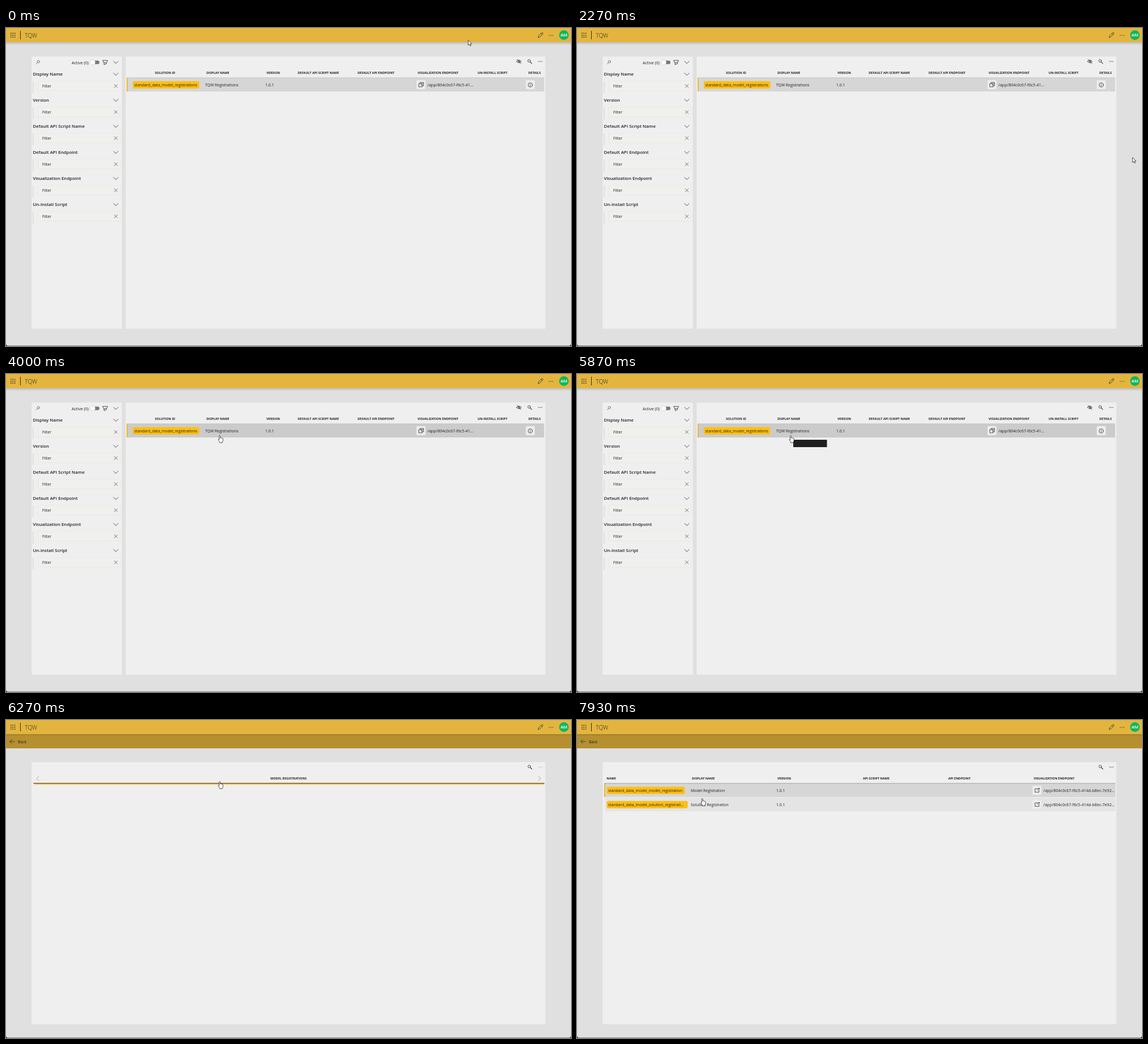
An HTML page that plays this animation: 998 px wide and 561 px high, repeating every 8 s.

```html
<!DOCTYPE html>
<html lang="en">
<head>
<meta charset="utf-8">
<title>Registrations</title>
<style>
  html, body { margin: 0; width: 100%; height: 100%; overflow: hidden; background: #2a2a2a; }
  svg { display: block; width: 998px; height: 561px; }
  text { font: 6.9px "Open Sans", sans-serif; fill: #222; white-space: pre; }
  .head { font-size: 5.5px; font-weight: 700; }
  .group { font-size: 7.9px; font-weight: 600; }
  .path { font-size: 7.1px; }
  .pill { font-size: 6.8px; }
  .title { font-size: 10.2px; font-weight: 300; }
  .ln { fill: none; stroke: #333; stroke-width: .85; stroke-linecap: round; stroke-linejoin: round; }
  .cur { fill: #fff; stroke: #222; stroke-width: .8; stroke-linejoin: round; }
</style>
</head>
<body>
<svg id="stage" viewBox="0 0 998 561" xmlns="http://www.w3.org/2000/svg"></svg>
<script>
const LOOP = 8000, STEP = 200 / 3;

const text = (x, y, s, cls = '', more = '') => `<text x="${x}" y="${y}" class="${cls}" ${more}>${s}</text>`;
const rect = (x, y, w, h, fill, more = '') => `<rect x="${x}" y="${y}" width="${w}" height="${h}" fill="${fill}" ${more}/>`;
const line = (d, more = '') => `<path class="ln" d="${d}" ${more}/>`;
const dot = (x, y, r, fill = '#333') => `<circle cx="${x}" cy="${y}" r="${r}" fill="${fill}"/>`;
const group = (id, body) => `<g id="${id}">${body}</g>`;

const panel = (x, y, w, h) => rect(x, y, w, h, '#efefef', 'stroke="#d9d9d9" stroke-width=".5"');
const dots = (x, y, gap = 2.8) => [-gap, 0, gap].map(d => dot(x + d, y, .75)).join('');
const chevron = (x, y) => line(`M${x - 4} ${y - 2}l4 4 4-4`);
const cross = (x, y) => line(`M${x - 2.8} ${y - 2.8}l5.6 5.6m0-5.6l-5.6 5.6`, 'style="stroke-width:.65"');
const search = (x, y) => line(`M${x + .9} ${y + .9}l2.7 2.7`, 'style="stroke-width:1.2"') +
  `<circle class="ln" cx="${x - 1}" cy="${y - 1}" r="2.3"/>`;
const button = (x, y) => rect(x, y, 16, 16, '#ececec', 'rx="2"');
const pill = (x, y, w, s) => rect(x, y, w, 13, '#fdbf13', 'rx="2.8"') + text(x + 2.5, y + 8.9, s, 'pill');
const heads = (y, cols) => cols.map(([x, s]) => text(x, y, s, 'head')).join('');

function topBar() {
  let s = rect(0, 0, 998, 25, '#e4b53e');
  for (let i = 0; i < 9; i++) s += rect(8 + i % 3 * 3.4, 8.5 + (i / 3 | 0) * 3.4, 1.6, 1.6, '#333');
  return s + rect(25, 5, 1, 15, '#3a3010') + text(33.3, 16.7, 'TQW', 'title') +
    line('M940 16.5l.7-2.7 5.4-5.4q1.1-.8 2 .1t.1 2l-5.4 5.3z M945 9.5l2 2') +
    dots(962.8, 13, 3.2) + dot(985.5, 12.5, 8.5, '#12b55f') +
    text(985.5, 15.3, 'AM', '', 'text-anchor="middle" style="fill:#fff;font-size:7.6px;font-weight:600"');
}

function filters() {
  const names = ['Display Name', 'Version', 'Default API Script Name', 'Default API Endpoint',
    'Visualization Endpoint', 'Un-Install Script'];
  return panel(45, 50, 160, 481) +
    '<circle class="ln" cx="57.2" cy="59.4" r="2.1" style="stroke-width:.6"/>' +
    line('M55.6 61l-2.3 2.3', 'style="stroke-width:.6"') +
    text(116, 63.5, 'Active (0)', 'path') +
    rect(151, 57.4, 14, 6.4, '#777', 'rx="3.2"') +
    `<circle cx="153" cy="60.6" r="4.7" fill="#fafafa" stroke="#bbb" stroke-width=".5"/>` +
    line('M171 57.2h8.6l-2.2 4h-4.2z M173.2 61.2v3.6l4.2-1.8v-1.8') + chevron(194, 60.7) +
    names.map((name, i) => {
      const y = 81.5 + i * 46;
      return text(47.5, y + 2.9, name, 'group') + chevron(194, y) +
        rect(47.5, y + 12.5, 1, 21, '#d3d3dc') +
        rect(56.5, y + 12.5, 145, 16.5, '#f0f0ef', 'stroke="#ece5d3" stroke-width=".7"') +
        text(64, y + 23.4, 'Filter') + cross(194, y + 20.8);
    }).join('');
}

function solutions() {
  return panel(211, 50, 742, 481) +
    line('M902 59q4-5 8.2 0q-4 5-8.2 0zM902.7 55.4l7 7.2') +
    '<circle class="ln" cx="906.1" cy="59" r="1.3"/>' + search(925, 59) + dots(943.7, 59) +
    heads(81.2, [[263, 'SOLUTION ID'], [354, 'DISPLAY NAME'], [460, 'VERSION'],
      [515.3, 'DEFAULT API SCRIPT NAME'], [621, 'DEFAULT API ENDPOINT'],
      [727, 'VISUALIZATION ENDPOINT'], [833, 'UN-INSTALL SCRIPT'], [922.8, 'DETAILS']]) +
    rect(213, 88, 737.5, 24, '#d6d6d6', 'id="solRow"') +
    rect(213, 87.5, 737.5, .8, '#bababa') + rect(213, 88, 2, 24, '#f5bb1c') +
    pill(224, 93.8, 117.5, 'standard_data_model_registrations') +
    text(351.7, 102.8, 'TQW Registrations') + text(458, 102.8, '1.0.1') +
    button(725, 92) + line('M729.5 98h5.5v5.8h-5.5zM731.5 98v-2h6v6h-2.5M733 100.5l2.8-2.8') +
    text(744.3, 102.9, '/app/804c0c67-f6c5-41...', 'path') +
    button(918, 92) + '<circle class="ln" cx="926" cy="100.4" r="3.7"/>' +
    line('M926 100v2.2M926 98.4v.1');
}

function modelRow(id, y, fill, width, key, name) {
  return rect(50, y, 901, 24, fill, `id="${id}"`) + pill(52.5, y + 5.8, width, key) +
    text(201, y + 14.9, name) + text(352, y + 14.9, '1.0.1') + button(804.5, y + 4) +
    line(`M814 ${y + 9.3}h-5v6h7v-3.5M813.5 ${y + 11.7}l3.2-3.2m-1.7 0h1.7v1.7`) +
    text(823.8, y + 14.9, '/app/804c0c67-f6c5-414d-b8ec-7e92...', 'path');
}

const models = () => dots(944, 83) +
  heads(105.3, [[52.3, 'NAME'], [203, 'DISPLAY NAME'], [354, 'VERSION'], [505, 'API SCRIPT NAME'],
    [655.8, 'API ENDPOINT'], [806.7, 'VISUALIZATION ENDPOINT']]) +
  modelRow('row1', 112, '#d6d6d6', 138, 'standard_data_model_model_registration', 'Model Registration') +
  modelRow('row2', 137, '#efefef', 143, 'standard_data_model_solution_registrati...', 'Solution Registration') +
  rect(48, 111.4, 903, .9, '#999') + rect(48, 112, 2, 24, '#e9b62c');

const loading = () => rect(940, 82.6, 8, .8, '#c4c4c4') +
  line('M58 99.3l-4 4 4 4M940.5 99.3l4 4-4 4', 'style="stroke:#999"') +
  text(499, 105.3, 'MODEL REGISTRATIONS', 'head', 'text-anchor="middle"') +
  rect(48, 111, 903, 1, '#57482a') + rect(50, 112, 901, 1.8, '#f0b41c');

const stage = document.getElementById('stage');
stage.innerHTML = `<defs><linearGradient id="shade" x2="0" y2="1">
    <stop stop-color="#000" stop-opacity=".16"/><stop offset="1" stop-color="#000" stop-opacity="0"/>
  </linearGradient><clipPath id="win">${rect(0, -4, 998, 564.4, '#fff', 'rx="4"')}</clipPath></defs>
  <g clip-path="url(#win)">` + rect(0, 0, 998, 561, '#e0e0e0') +
  group('list', rect(0, 25, 998, 5, 'url(#shade)') + filters() + solutions()) +
  group('detail', rect(0, 25, 998, 25, '#b69030') + rect(0, 25, 998, 3, 'url(#shade)') +
    line('M15 38H6.8m3.5-3.5L6.8 38l3.5 3.5') + text(21, 40.5, 'Back') +
    group('sheet', panel(45, 74, 908, 463) + search(925.3, 83)) +
    group('loading', loading()) + group('models', models())) +
  topBar() +
  group('tip', rect(382, 116, 59.5, 13, '#1f1f1f') +
    text(386, 124.7, 'TQW Registrations', '', 'id="tipText" style="fill:#eee;font-size:5.9px"')) +
  group('cursor',
    '<path id="arrow" class="cur" d="M0 0v8.8l2-1.8 1.4 3 1.5-.7-1.4-2.9h2.7z"/>' +
    '<path id="hand" class="cur" d="M-.9 7.2V1Q-.8 0 0 0t1 1v3.4q1-.7 1.7.2q1-.6 1.7.3q1.3-.3 1.3 1v2.6q0 1.8-1.1 3.2v1H.2v-1L-2.1 8.2q-.8-1.3.2-1.7z"/>') +
  '</g>';

const el = {};
stage.querySelectorAll('[id]').forEach(n => el[n.id] = n);
const show = (id, on) => { el[id].style.display = on ? '' : 'none'; };

// Pointer stops: time, x, y
const stops = [[0, 816.4, 21.6], [66, 816.4, 21.6], [200, 838, 23.5], [2200, 838, 23.5],
  [2266, 981.3, 228.4], [2800, 441.5, 235], [3270, 809, 170], [3730, 350.5, 97.5],
  [4000, 377.5, 108.5], [7133, 377.5, 108.5], [7400, 255, 128], [7600, 255, 128], [7930, 221.3, 138.6]];

function pointer(t) {
  const i = stops.findIndex(s => s[0] > t);
  if (i < 0) return stops[stops.length - 1].slice(1);
  const [t0, x0, y0] = stops[i - 1], [t1, x1, y1] = stops[i];
  const p = (t - t0) / (t1 - t0), e = p * p * (3 - 2 * p);
  return [x0 + (x1 - x0) * e, y0 + (y1 - y0) * e];
}

function draw(now) {
  const t = now % LOOP;
  const [x, y] = pointer(Math.floor((t + 4) / STEP) * STEP);
  const inDetail = t >= 6068;
  const over = (top, bottom) => y >= top && y < bottom;
  const onRow = !inDetail && over(88, 112);
  const useHand = onRow || inDetail;

  show('list', !inDetail);
  show('detail', inDetail);
  show('sheet', t >= 6128);
  show('loading', t >= 6196 && t < 6328);
  show('models', t >= 6328);
  show('tip', t >= 4528 && t < 5928);
  show('tipText', t < 5868);
  el.solRow.setAttribute('fill', onRow ? '#cbcbcb' : '#d6d6d6');
  el.row1.setAttribute('fill', over(112, 136.5) ? '#cbcbcb' : '#d6d6d6');
  el.row2.setAttribute('fill', over(136.5, 161) ? '#e4e4e4' : '#efefef');

  show('cursor', t < 266 || t >= 2264);
  show('hand', useHand);
  show('arrow', !useHand);
  el.cursor.setAttribute('transform', `translate(${x.toFixed(2)} ${y.toFixed(2)})`);
}

const start = performance.now();
function tick() {
  draw(performance.now() - start);
  requestAnimationFrame(tick);
}
tick();
</script>
</body>
</html>
```
